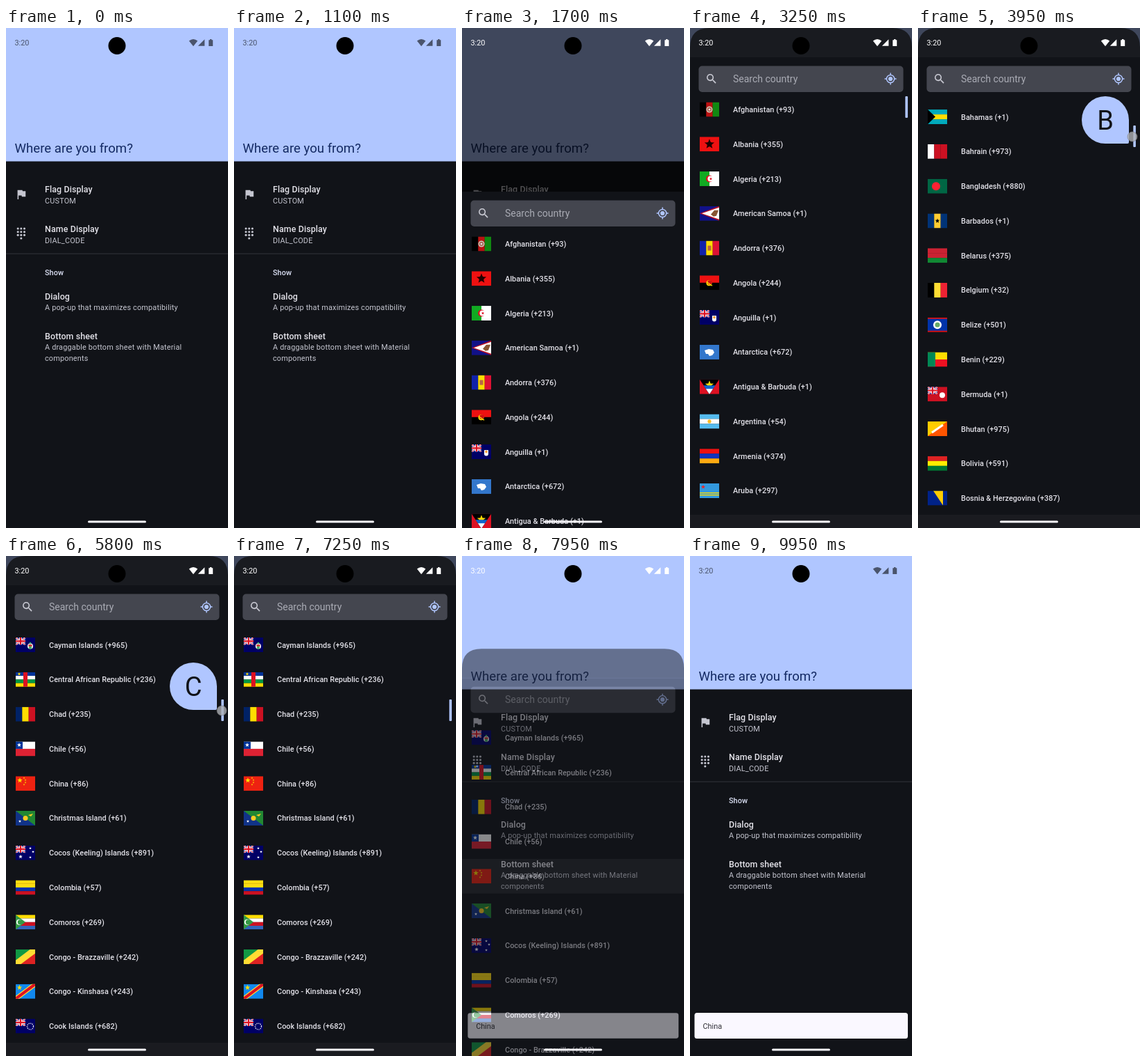
Animation of 320x718 px, one loop 10 s. Source, as an HTML page:

```html
<!DOCTYPE html>
<html lang="en">
<head>
<meta charset="utf-8">
<title>Country picker</title>
<style>
html, body { margin: 0; width: 100%; height: 100%; overflow: hidden; background: #111318; }
svg { display: block; }
text { font-family: Roboto, "Noto Sans", sans-serif; font-size: 10.89px; fill: #e3e2e9; white-space: pre; }
.title { font-size: 12.44px; font-weight: 500; letter-spacing: .1px; }
.sub { fill: #c5c6d0; letter-spacing: .18px; }
.row { font-weight: 500; letter-spacing: .03px; }
</style>
</head>
<body>
<svg id="stage" width="320" height="718" viewBox="0 0 320 718"></svg>
<script>
const LOOP = 10000, ROW = 49.77, SHEET_REST = 193;

// name | dial code | flag drawing steps on a 28 x 21 field
const COUNTRIES = `Afghanistan|93|v,000,b11,181 c,14,10.5,4.5,ccb c,14,10.5,3,a54 c,14,10.5,1.6,ddd
Albania|355|h,e11 s,14,10.5,7.5,200 c,14,10.5,3.5,200
Algeria|213|v,1a2,fff c,14,10.5,5,d12 c,15.5,10.5,4,fff s,16,10.5,2.4,d12
American Samoa|1|h,118 t,0,10.5,28,0,28,21,b12 t,3,10.5,28,2,28,19,fff t,16,12,21,6,27,6,24,14,20,15,853
Andorra|376|v,12a,fd0,d13 r,11.5,7,5,7,b64
Angola|244|h,e11,000 c,13.5,11,4,fd0 c,14.5,10.2,3.3,c11 l,11,10,18,15,1.2,fd0
Anguilla|1|u r,18,8,6,6,fff c,21,13.5,3,fff c,21,10.5,1.8,f93
Antarctica|672|h,37c t,7,8,13,6,19,7,21,11,18,15,14,16,12,13,9,13,fff
Antigua & Barbuda|1|h,d12 t,0,0,28,0,14,21,000 s,14,8,6.5,fd0 t,5.5,8.5,22.5,8.5,14,21,16c t,9,13.5,19,13.5,14,21,fff
Argentina|54|h,5be,fff,5be c,14,10.5,2.6,fb2
Armenia|374|h,e11,13b,fa1
Aruba|297|h,39d r,0,13,28,1.4,fd0 r,0,16,28,1.4,fd0 s,5,5,3.2,e22
Australia|61|u s,7,16,3,fff s,21,4,2,fff s,21,17,2,fff s,25,9,2,fff
Austria|43|h,d23,fff,d23
Azerbaijan|994|h,0ad,d23,393 c,13,10.5,2.6,fff
Bahamas|1|h,0ab,fd0,0ab t,0,0,11,10.5,0,21,000
Bahrain|973|v,fff,c12,c12
Bangladesh|880|h,064 c,12,10.5,6,f23
Barbados|1|v,037,fc3,037 s,14,10.5,3.5,000
Belarus|375|h,c23,c23,183
Belgium|32|v,000,fd3,e23
Belize|501|h,d11 r,0,2,28,17,03a c,14,10.5,6,fff c,14,10.5,3.5,6a6
Benin|229|h,fd0,e12 r,0,0,11,21,085
Bermuda|1|h,c12 j c,21,12,4,fff
Bhutan|975|h,fc0 t,28,0,28,21,0,21,f50 l,6,16,22,5,3,fff
Bolivia|591|h,d22,fe0,073
Bosnia & Herzegovina|387|h,028 t,8,0,22,0,22,21,fc0
Botswana|267|h,6ad r,0,7.5,28,6,fff r,0,8.7,28,3.6,000
Bouvet Island|47|h,e23 r,0,8,28,5,fff r,8,0,5,21,fff r,0,9.2,28,2.6,026 r,9.2,0,2.6,21,026
Brazil|55|h,094 t,14,2,26,10.5,14,19,2,10.5,fd0 c,14,10.5,4.5,027
British Indian Ocean Territory|246|h,fff,229,fff,229,fff,229 j
British Virgin Islands|1|u r,18,8,6,5,283 c,21,13,3,283 c,21,11.5,1.6,fff
Brunei|673|h,fd0 l,0,5,28,16,6,fff l,0,7,28,18,3,000 c,14,10.5,5,c22 c,14,9,3,eb2
Bulgaria|359|h,fff,0a6,d21
Burkina Faso|226|h,d12,094 s,14,10.5,5.5,fd0
Burundi|257|h,1a3 t,0,0,28,0,14,10.5,d12 t,0,21,28,21,14,10.5,d12 l,0,0,28,21,3,fff l,0,21,28,0,3,fff c,14,10.5,5.5,fff c,14,9,1.3,d12 c,12.3,12,1.3,d12 c,15.7,12,1.3,d12
Cambodia|855|h,03a,d12,d12,03a r,8,11,12,4,fff t,10,12,14,6,18,12,fff
Cameroon|237|v,073,c12,fd1 s,14,10.5,4,fd0
Canada|1|h,fff r,0,0,7,21,d12 r,21,0,7,21,d12 s,14,10,6,d12 r,13.5,11,1,6,d12
Cape Verde|238|h,03a r,0,11,28,6,fff r,0,13,28,2,c22 o,11,13,4.5,fd0
Caribbean Netherlands|599|h,b22,fff,248
Cayman Islands|965|u c,21,12.5,4,fff r,18.5,10,5,3,c33 c,21,14.5,2.2,4a6 c,21,8,1.4,4a6
Central African Republic|236|h,039,fff,094,fd0 r,11,0,6,21,d12 s,5,2.6,2.5,fd0
Chad|235|v,026,fd0,c12
Chile|56|h,fff,d23 r,0,0,10,10.5,039 s,5,5,3.2,fff
China|86|h,e21 s,6,6,4,fd0 s,12,2.5,1.5,fd0 s,14,5.5,1.5,fd0 s,14,9,1.5,fd0 s,12,12,1.5,fd0
Christmas Island|61|h,138 t,0,0,28,0,28,21,283 c,14,10.5,3.5,fc2 t,18,6,25,4,22,8,fc2 s,6,15,2.2,fff
Cocos (Keeling) Islands|891|u s,7,16,3,fff s,21,4,2,fff s,21,17,2,fff s,25,9,2,fff
Colombia|57|h,fd1,fd1,03a,c12
Comoros|269|h,fd0,fff,c12,36b t,0,0,14,10.5,0,21,394 c,5,10.5,4,fff c,6.3,10.5,3.5,394
Congo - Brazzaville|242|h,194 t,28,0,28,21,0,21,d22 l,-2,22.5,30,-1.5,9,fd3
Congo - Kinshasa|243|h,18e l,-1,21.7,29,-.7,6.5,fd3 l,-1,21.7,29,-.7,4.2,d12 s,5.5,5,4,fd0
Cook Islands|682|u o,21,11,4.5,fff`.split("\n").map(line => line.split("|"));

const rect = (x, y, w, h, fill, more = "") =>
  `<rect x="${x}" y="${y}" width="${w}" height="${h}" fill="${fill}" ${more}/>`;
const circle = (x, y, r, fill, more = "") =>
  `<circle cx="${x}" cy="${y}" r="${r}" fill="${fill}" ${more}/>`;
const line = (x1, y1, x2, y2, w, color) =>
  `<path d="M${x1} ${y1}L${x2} ${y2}" stroke="${color}" stroke-width="${w}"/>`;
const text = (x, y, str, cls = "", more = "") =>
  `<text x="${x}" y="${y}" class="${cls}" ${more}>${str.replace("&", "&amp;")}</text>`;
const icon = (x, y, d, fill) =>
  `<path transform="translate(${x} ${y}) scale(.778)" d="${d}" fill="${fill}"/>`;

function star(x, y, r, fill) {
  const pts = Array.from({ length: 10 }, (_, i) => {
    const a = i * Math.PI / 5, q = i % 2 ? r * .42 : r;
    return `${(+x + q * Math.sin(a)).toFixed(2)},${(y - q * Math.cos(a)).toFixed(2)}`;
  });
  return `<polygon points="${pts.join(" ")}" fill="${fill}"/>`;
}

const jack = () => `<svg width="14" height="10.5">` + rect(0, 0, 14, 10.5, "#129") +
  [[2.4, "#fff"], [1, "#d12"]].map(([w, c]) => line(0, 0, 14, 10.5, w, c) + line(0, 10.5, 14, 0, w, c)).join("") +
  [[3.8, "#fff"], [2.2, "#d12"]].map(([w, c]) => line(7, 0, 7, 10.5, w, c) + line(0, 5.25, 14, 5.25, w, c)).join("") + `</svg>`;

const draw = {
  h: (...cs) => cs.map((c, i) => rect(0, i * 21 / cs.length, 28, 21 / cs.length + .05, "#" + c)).join(""),
  v: (...cs) => cs.map((c, i) => rect(i * 28 / cs.length, 0, 28 / cs.length + .05, 21, "#" + c)).join(""),
  r: (x, y, w, h, c) => rect(x, y, w, h, "#" + c),
  c: (x, y, r, c) => circle(x, y, r, "#" + c),
  s: (x, y, r, c) => star(x, y, r, "#" + c),
  l: (a, b, c, d, w, col) => line(a, b, c, d, w, "#" + col),
  o: (x, y, r, c) => circle(x, y, r, "none", `stroke="#${c}" stroke-width="1.3" stroke-dasharray="1.3 1.3"`),
  t: (...a) => `<polygon fill="#${a.pop()}" points="${a.join(" ")}"/>`,
  j: jack,
  u: () => rect(0, 0, 28, 21, "#006") + jack()
};

const flag = (y, steps) => `<svg x="14" y="${y}" width="28" height="21">` +
  steps.split(" ").map(step => {
    const [op, ...args] = step.split(",");
    return draw[op](...args);
  }).join("") + `</svg>`;

const rows = COUNTRIES.map(([name, code, steps], i) => {
  const y = 117 + i * ROW;
  return flag(y - 10.5, steps) + text(62, y + 4, `${name} (+${code})`, "row");
}).join("");

const dots = [6, 12, 18].flatMap(x => [3, 9, 15].map(y => [x, y])).concat([[12, 21]])
  .map(([x, y]) => circle(12.5 + x * .778, 285.7 + y * .778, 1.55, "#c5c6d0")).join("");

const FLAG_ICON = "M14.4 6L14 4H5v17h2v-7h5.6l.4 2h7V6z";
const SEARCH_ICON = "M15.5 14h-.79l-.28-.27A6.47 6.47 0 0 0 16 9.5 6.5 6.5 0 1 0 9.5 16c1.61 0 3.09-.59 4.23-1.57l.27.28v.79l5 4.99L20.49 19l-4.99-5zm-6 0C7.01 14 5 11.99 5 9.5S7.01 5 9.5 5 14 7.01 14 9.5 11.99 14 9.5 14z";

const home = rect(0, 0, 320, 718, "#111318") + rect(0, 0, 320, 191.5, "#b0c6ff") +
  text(12.6, 179, "Where are you from?", "", `style="font-size:18.6px;fill:#142a63"`) +
  icon(12.7, 229.7, FLAG_ICON, "#c5c6d0") + dots +
  text(56, 236.2, "Flag Display", "title") + text(56, 251.5, "CUSTOM", "sub") +
  text(56, 293.2, "Name Display", "title") + text(56, 308.5, "DIAL_CODE", "sub") +
  rect(0, 323.7, 320, .8, "#3a3c43") +
  text(56, 354.8, "Show", "row", `style="fill:#dce1f5"`) +
  text(56, 390, "Dialog", "title") + text(56, 405.3, "A pop-up that maximizes compatibility", "sub") +
  text(56, 446.8, "Bottom sheet", "title") +
  text(56, 462.3, "A draggable bottom sheet with Material", "sub") + text(56, 478.2, "components", "sub");

const search = rect(12.5, 54.5, 295, 37.5, "#44464f", `rx="5"`) +
  icon(21.7, 63.7, SEARCH_ICON, "#c9cad3") +
  text(62, 78.3, "Search country", "", `style="font-size:14px;fill:#a9abb4"`) +
  circle(289, 73, 5.6, "none", `stroke="#b0c6ff" stroke-width="1.5"`) + circle(289, 73, 3.1, "#b0c6ff") +
  [[289, 64.5, 289, 67.5], [289, 78.5, 289, 81.5], [280.5, 73, 283.5, 73], [294.5, 73, 297.5, 73]]
    .map(p => line(...p, 1.5, "#b0c6ff")).join("");

document.getElementById("stage").innerHTML = `
<defs><clipPath id="listClip">${rect(0, 93, 320, 606, "#000")}</clipPath></defs>
${home}
<g id="snack">${rect(6.5, 656, 307.5, 37, "#faf8ff", `rx="3.5"`)}${text(18.5, 678.8, "China", "", `style="fill:#303036"`)}</g>
${rect(0, 0, 320, 718, "#000", `id="scrim"`)}
<g id="sheet">
  <path id="strip" fill="#191b20"/>
  ${rect(0, 42, 320, 680, "#111318")}
  <g clip-path="url(#listClip)"><g id="list">${rect(0, 92.1 + 45 * ROW, 320, ROW, "#fff", `id="press"`)}${rows}</g></g>
  ${search}
  ${rect(0, 699, 320, 19, "#1a1b20")}
  ${rect(310.3, 98, 3.6, 31, "#b0c6ff", `id="thumb" rx="1"`)}
  <g id="bubble">
    <path d="M302 68H270A34 34 0 1 1 304 34V66Q304 68 302 68Z" fill="#b0c6ff"/>
    <text id="letter" x="270" y="48.2" text-anchor="middle" style="font-size:38px;fill:#111318"></text>
  </g>
  <circle id="touch" r="7" fill="#aeb0b5" fill-opacity=".8" stroke="#777" stroke-width=".6"/>
</g>
${circle(160, 25.5, 12.5, "#000")}
<g id="status">
  <text x="12.5" y="24.8" style="fill:inherit">3:20</text>
  <path d="M263.8 18.6Q270 13.6 276.2 18.6L270 26.2Z"/>
  <path d="M286.3 16.2V25.8H276.8Z"/>
  <path d="M292.2 17.3H294V16H296.4V17.3H298.2V26H292.2Z"/>
</g>
${rect(118, 707.5, 84, 3, "#f4f3f8", `rx="1.5"`)}`;

const el = {};
document.querySelectorAll("#stage [id]").forEach(n => el[n.id] = n);
const set = (id, name, value) => el[id].setAttribute(name, value);
const clamp = (v, a = 0, b = 1) => Math.min(b, Math.max(a, v));
const ramp = (t, a, b) => clamp((t - a) / (b - a));
const easeOut = p => 1 - (1 - p) ** 3;
const smooth = p => p * p * (3 - 2 * p);

function render(t) {
  const open = t >= 1150 && t < 8100;
  const rise = easeOut(ramp(t, 1150, 1500)), pull = smooth(ramp(t, 2250, 2950)), exit = ramp(t, 7810, 8090);

  let y = 718 - (718 - SHEET_REST) * rise - SHEET_REST * pull;
  const inset = clamp(y / SHEET_REST), top = 42 * inset, r = Math.min(28 * (1 - inset), 42 - top);
  if (exit > 0) y = 740 * exit ** 2.5;
  set("sheet", "display", open ? "inline" : "none");
  set("sheet", "transform", `translate(0 ${y.toFixed(2)})`);
  set("sheet", "opacity", 1 - exit);
  set("strip", "d", `M0 42.1V${top + r}Q0 ${top} ${r} ${top}H${320 - r}Q320 ${top} 320 ${top + r}V42.1Z`);
  set("scrim", "opacity", .64 * ramp(t, 1150, 1400) * (1 - ramp(t, 7780, 7930)));

  // fast scrolling snaps the list to whole rows
  const travel = 84 * ramp(t, 3400, 4500) + 24 * ramp(t, 4600, 5600);
  const first = Math.floor(travel * .38 + .001);
  set("list", "transform", `translate(0 ${(first ? 10.6 : 0) - first * ROW})`);
  set("press", "opacity", .09 * ramp(t, 7620, 7720));
  set("thumb", "y", 98 + travel);
  set("thumb", "opacity", ramp(t, 2900, 3050) * (1 - ramp(t, 7350, 7550)));
  set("bubble", "transform", `translate(0 ${Math.max(98, 45 + travel)})`);
  set("bubble", "opacity", ramp(t, 3380, 3530) * (1 - ramp(t, 6200, 6400)));
  el.letter.textContent = COUNTRIES[Math.floor(travel * .43)][0][0];
  set("touch", "cx", 309 + 2 * ramp(t, 4600, 5600));
  set("touch", "cy", 114 + travel);
  set("touch", "opacity", t >= 3350 && t < 6200 ? 1 : 0);

  const pop = ramp(t, 7800, 8000), scale = .8 + .2 * (1 - (1 - pop) ** 2);
  set("snack", "opacity", ramp(t, 7800, 7950));
  set("snack", "transform", `translate(160 674.5) scale(${scale}) translate(-160 -674.5)`);
  set("status", "fill", open ? "#fff" : "#4a546c");
}

const start = performance.now();
function tick() {
  render((performance.now() - start) % LOOP);
  requestAnimationFrame(tick);
}
render(0);
requestAnimationFrame(tick);
</script>
</body>
</html>
```
